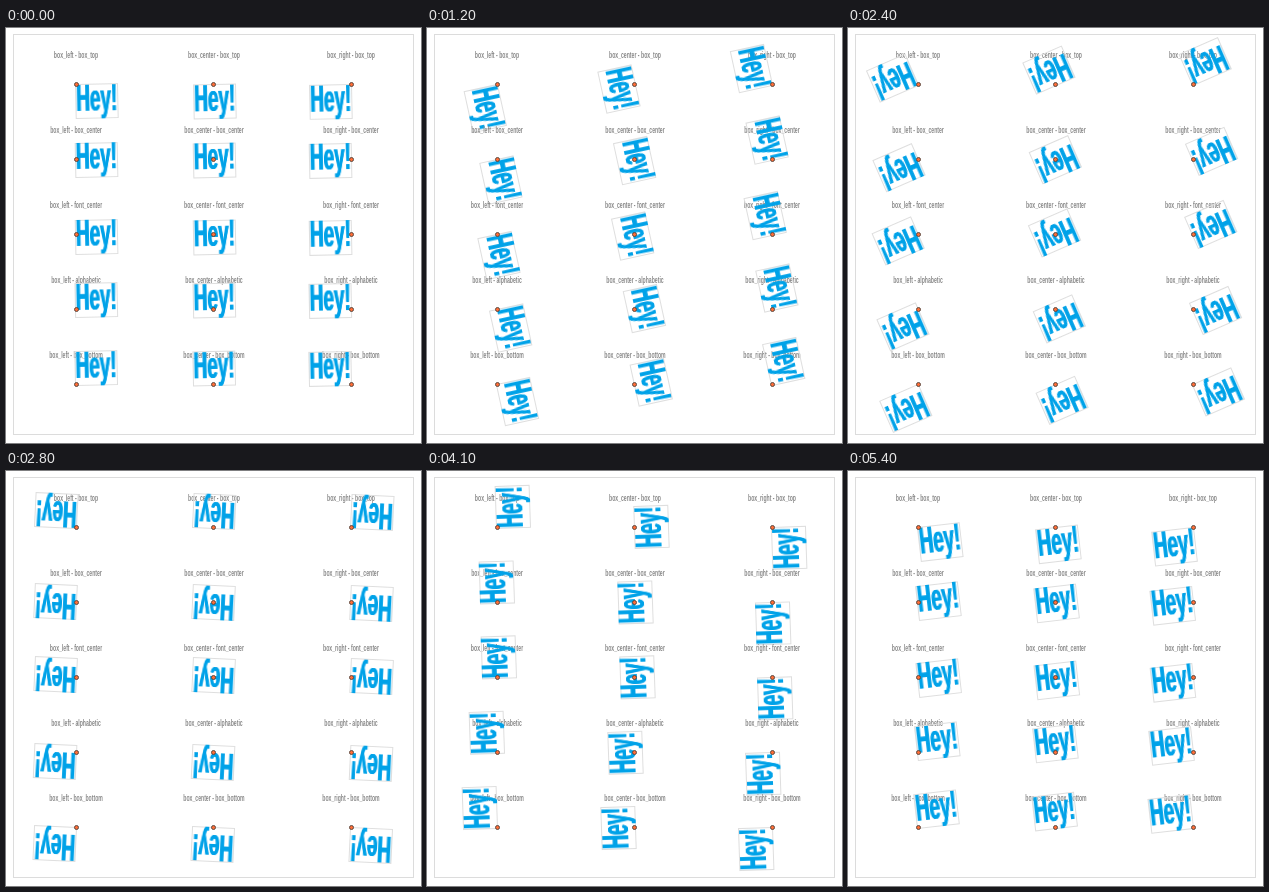
Write an HTML page that moves like this. It is 415 px wide and 415 px high and loops after 5500 ms.

```html
<!DOCTYPE html>
<html lang="en">
<head>
<meta charset="utf-8">
<title>Text alignment</title>
<style>
html, body {
  margin: 0;
  width: 100%;
  height: 100%;
  overflow: hidden;
  background: #fff;
}
#board {
  position: absolute;
  left: 7px;
  top: 6px;
  width: 401px;
  height: 401px;
  overflow: hidden;
  box-shadow: inset 0 0 0 1px #dcdcdc;
  font-family: "Liberation Sans", Arial, sans-serif;
  font-weight: bold;
}
#board * {
  position: absolute;
  box-sizing: border-box;
  white-space: nowrap;
}
.label {
  top: -29.3px;
  color: #888;
  font-size: 9.5px;
  line-height: 10px;
  transform: translate(-50%, -50%) scaleX(.541);
}
.spin {
  width: 0;
  height: 0;
  animation: spin 5.5s steps(55) infinite;
}
.box {
  width: 41px;
  height: 33px;
  outline: 1px solid #dedede;
  outline-offset: -.5px;
}
.word {
  left: 0;
  top: -3.5px;
  color: #00a2e8;
  font-size: 37px;
  line-height: 33px;
  transform: scaleX(.511);
  transform-origin: 0 0;
  text-shadow: .8px 0, -.8px 0;
}
.dot {
  left: -2.5px;
  top: -2.5px;
  width: 5px;
  height: 5px;
  border: 1px solid #5c4a42;
  border-radius: 50%;
  background: #ff6c35;
}
@keyframes spin {
  from { transform: rotate(-1.2deg); }
  to { transform: rotate(360deg); }
}
</style>
</head>
<body>
<div id="board"></div>
<script>
const board = document.getElementById('board');

// Anchor offsets measured from the box's top left corner
const cols = [['box_left', 0], ['box_center', 20.5], ['box_right', 41]];
const rows = [
  ['box_top', 0], ['box_center', 16.5], ['font_center', 14.2],
  ['alphabetic', 25.8], ['box_bottom', 33]
];

function add(parent, name, text = '') {
  const el = document.createElement('div');
  el.className = name;
  el.textContent = text;
  parent.append(el);
  return el;
}

function place(el, x, y) {
  el.style.left = x + 'px';
  el.style.top = y + 'px';
  return el;
}

rows.forEach(([rowName, dy], r) => cols.forEach(([colName, dx], c) => {
  const anchor = place(add(board, 'anchor'), 63 + 137.5 * c, 50.5 + 75 * r);
  add(anchor, 'label', `${colName} - ${rowName}`);
  const box = place(add(add(anchor, 'spin'), 'box'), -dx, -dy);
  add(box, 'word', 'Hey!');
  add(anchor, 'dot');
}));
</script>
</body>
</html>
```
